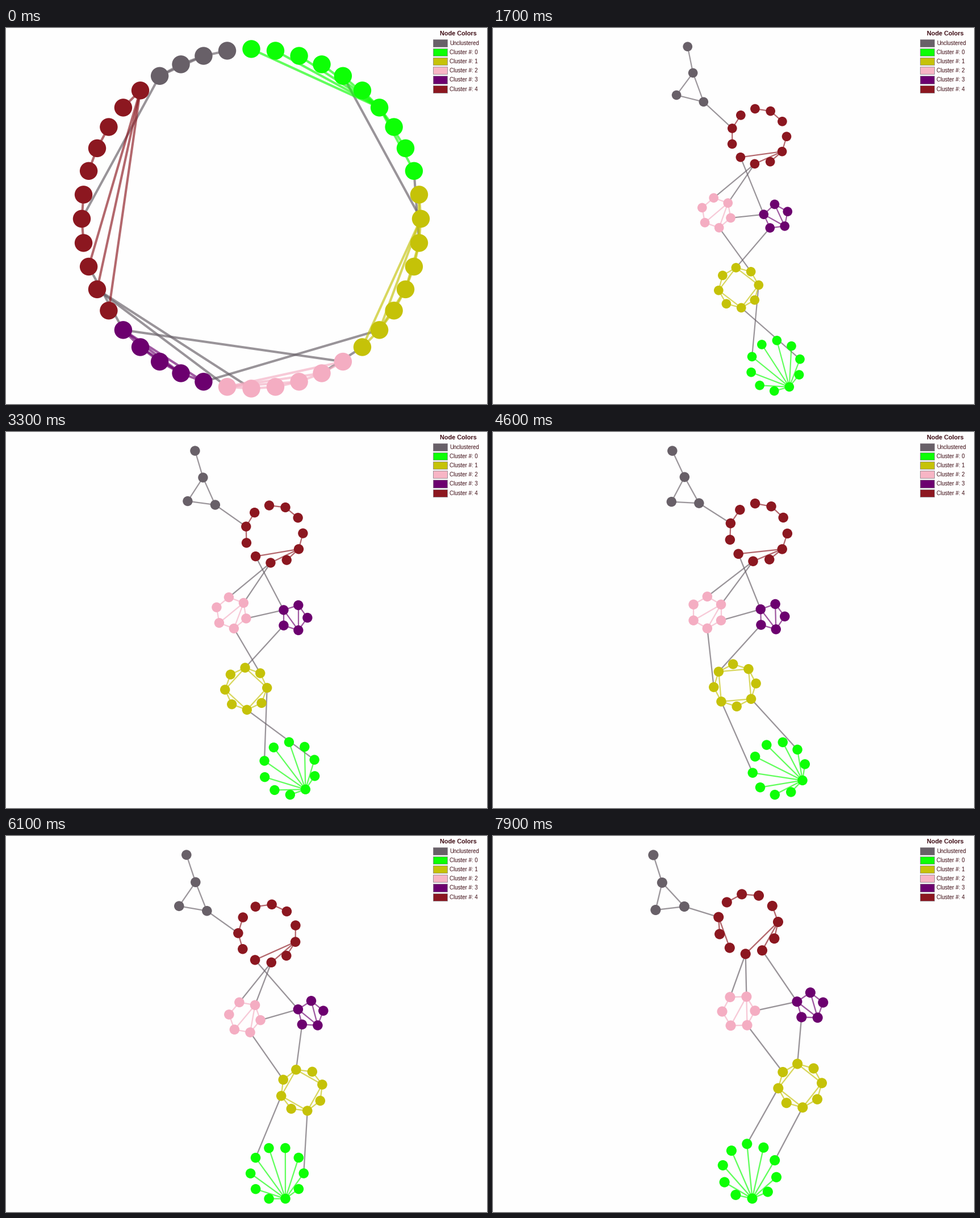
Animation, 847 px wide and 661 px high, one loop 8000 ms. Source, as a matplotlib script:

```python
import numpy as np
import matplotlib.pyplot as plt
from matplotlib.animation import FuncAnimation
from matplotlib.collections import LineCollection
from matplotlib.colors import to_rgba
from matplotlib.patches import Rectangle

W, H, DPI = 847, 661, 64
PT = 72 / DPI
BACK = "#fefefe"
INK = "#3c0a12"
GREY = "#686068"

NAMES = ["green", "yellow", "pink", "purple", "red", "grey"]
SIZE = dict(green=10, yellow=8, pink=6, purple=5, red=11, grey=4)
COLOR = dict(green="#0dff05", yellow="#c5c208", pink="#f4adc2",
             purple="#6c006f", red="#8c1720", grey=GREY)
START = dict(zip(NAMES, np.cumsum([0] + [SIZE[n] for n in NAMES[:-1]])))
TOTAL = sum(SIZE.values())

# Order of each cluster's nodes along the opening ring
RING = dict(green=[0, 1, 2, 9, 3, 6, 5, 7, 8, 4],
            yellow=[6, 7, 1, 0, 2, 3, 4, 5],
            pink=[4, 5, 0, 1, 2, 3],
            purple=[4, 3, 2, 1, 0],
            red=[(k + 5) % 11 for k in range(11)],
            grey=[3, 2, 1, 0])


def cycle(n):
    return [(k, (k + 1) % n) for k in range(n)]


INNER = dict(
    green=[(5, k) for k in range(10) if k != 5],
    yellow=cycle(8) + [(0, 2), (2, 4), (4, 6), (6, 0)],
    pink=cycle(6) + [(1, 3), (1, 4)],
    purple=cycle(5) + [(0, 3), (1, 3)],
    red=[(0, 10), (9, 10), (1, 2), (2, 3)] + [(5, k) for k in (4, 6, 7, 8)],
    grey=[(0, 1), (1, 2), (1, 3), (2, 3)])
BRIDGES = [("grey", 3, "red", 10), ("red", 7, "pink", 0),
           ("red", 7, "pink", 1), ("red", 8, "purple", 0),
           ("pink", 2, "purple", 0), ("pink", 3, "yellow", 1),
           ("purple", 4, "yellow", 0), ("yellow", 2, "green", 9),
           ("yellow", 4, "green", 3)]

# Layout poses: frame, node spacing, then centre x, centre y, angle
KEYS = [12, 24, 33, 46, 61, 79]
SPACING = [25.93, 28.4, 29.1, 29.3, 29.4, 30.3]
TRACK = dict(
    green=([490.9, 499.2, 499.5, 503.4, 477.6, 451.9],
           [597.3, 592.5, 591.5, 591.2, 592.7, 588.9],
           [-125.2, -122.5, -127.2, -153.4, -108.1, -95.5]),
    yellow=([462.3, 425.2, 422.8, 426.1, 520.9, 540.6],
            [466.6, 453.9, 451.4, 445.0, 446.6, 438.6],
            [-111, -94.2, -92.5, -140, -105.4, -96.8]),
    pink=([384.4, 395.7, 397.0, 377.5, 420.6, 432.5],
          [331.3, 323.2, 318.0, 317.0, 318.5, 307.7],
          [-101.4, -100, -99.3, -90, -109.9, -121.3]),
    purple=([474.2, 504.6, 507.8, 490.6, 536.3, 558.0],
            [335.7, 331.0, 326.5, 324.6, 312.9, 299.2],
            [96.2, 214.7, 216, 214.5, 201.2, 199.8]),
    red=([469.4, 467.8, 472.1, 467.2, 460.5, 449.0],
         [206.4, 186.5, 179.3, 176.5, 171.0, 154.3],
         [-123.2, -132.4, -132.3, -128.9, -146.8, -167.2]))
LOOSE = [([344, 342.5, 333, 316, 318, 282.5], [32, 33, 33, 33, 33, 33.5]),
         ([357, 351, 347, 337.5, 334, 298], [67, 82, 80, 79, 81, 82]),
         ([334, 320.5, 320, 314.5, 305, 286.5], [114, 119, 121.5, 122.5, 123, 130]),
         ([390.5, 366, 368.5, 363, 354, 337], [133.5, 129, 128, 125, 131.5, 124])]

FLIP, SWAP = 40, 70
SWAPS = dict(green=[(9, 0), (3, 2)], red=[(0, 10), (7, 8)])
PAUSES = {14, 21, 53, 62, 68, 74}


def polar(cx, cy, radius, deg):
    a = np.radians(deg)
    return np.column_stack([cx + radius * np.cos(a), cy + radius * np.sin(a)])


def ring_pose():
    idx = np.concatenate([START[n] + np.array(RING[n]) for n in NAMES])
    return polar(432, 335.4, 298.5, -90 + 360 * idx / TOTAL), 15.7


def slots(name, frame):
    order = np.arange(SIZE[name])
    if name == "yellow" and frame >= FLIP:
        order = -order
    if frame >= SWAP:
        for a, b in SWAPS.get(name, []):
            order[[a, b]] = order[[b, a]]
    return order


def cluster_pose(frame):
    t = frame
    if t < KEYS[1]:  # the first settling slows down
        u = (t - KEYS[0]) / (KEYS[1] - KEYS[0])
        t = KEYS[0] + (KEYS[1] - KEYS[0]) * (1 - (1 - u) ** 3)

    def at(row):
        return np.interp(t, KEYS, row)

    gap = at(SPACING)
    parts = []
    for name in NAMES[:-1]:
        cx, cy, turn = map(at, TRACK[name])
        n = SIZE[name]
        parts.append(polar(cx, cy, n * gap / (2 * np.pi),
                           turn + 360 / n * slots(name, frame)))
    parts.append(np.array([[at(x), at(y)] for x, y in LOOSE]))
    return fit(np.vstack(parts), 0.298 * gap)


def fit(pts, r):
    """Centre the graph and zoom it to the stage height."""
    low, high = pts.min(axis=0), pts.max(axis=0)
    zoom = 622 / (high[1] - low[1] + 2 * r)
    return (pts - (low + high) / 2) * zoom + (431.8, 335.4), r * zoom


def pose(frame):
    if frame in PAUSES:
        frame -= 1
    return ring_pose() if frame < KEYS[0] else cluster_pose(frame)


edges, tints = [], []
for a, i, b, j in BRIDGES:
    edges.append((START[a] + i, START[b] + j))
    tints.append(to_rgba(GREY, 0.67))
for name in NAMES:
    for i, j in INNER[name]:
        edges.append((START[name] + i, START[name] + j))
        tints.append(to_rgba(COLOR[name], 0.65))
edges = np.array(edges)

fig = plt.figure(figsize=(W / DPI, H / DPI), dpi=DPI, facecolor=BACK)
ax = fig.add_axes([0, 0, 1, 1])
ax.set_xlim(0, W)
ax.set_ylim(H, 0)
ax.axis("off")

lines = LineCollection([], colors=tints, capstyle="butt", zorder=1)
ax.add_collection(lines, autolim=False)
fills = [COLOR[n] for n in NAMES for _ in range(SIZE[n])]
dots = ax.scatter(np.zeros(TOTAL), np.zeros(TOTAL), c=fills, linewidths=0, zorder=2)
ax.set_xlim(0, W)
ax.set_ylim(H, 0)


def label(x, y, text, size, **kw):
    ax.text(x, y, text, fontsize=size * PT, color=INK, va="baseline",
            family="Liberation Sans", **kw)


label(796.3, 13, "Node Colors", 10.9, weight="bold", ha="center")
legend = [("Unclustered", GREY), ("Cluster #: 0", COLOR["green"]),
          ("Cluster #: 1", COLOR["yellow"]), ("Cluster #: 2", "#f7b5c5"),
          ("Cluster #: 3", COLOR["purple"]), ("Cluster #: 4", COLOR["red"])]
for k, (text, tint) in enumerate(legend):
    mid = 26.6 + 16.1 * k
    ax.add_patch(Rectangle((752, mid - 6.6), 24.5, 13.2, facecolor=tint,
                           edgecolor="#8a8088", linewidth=0.8 * PT))
    label(781, mid + 3.5, text, 9.7)


def draw(frame):
    pts, r = pose(frame)
    lines.set_segments(pts[edges])
    lines.set_linewidth(r * 0.26 * PT)
    dots.set_offsets(pts)
    dots.set_sizes([(2 * r * PT) ** 2])
    return lines, dots


anim = FuncAnimation(fig, draw, frames=80, interval=100, repeat=True,
                     repeat_delay=0, init_func=lambda: draw(0))
plt.show()
```
